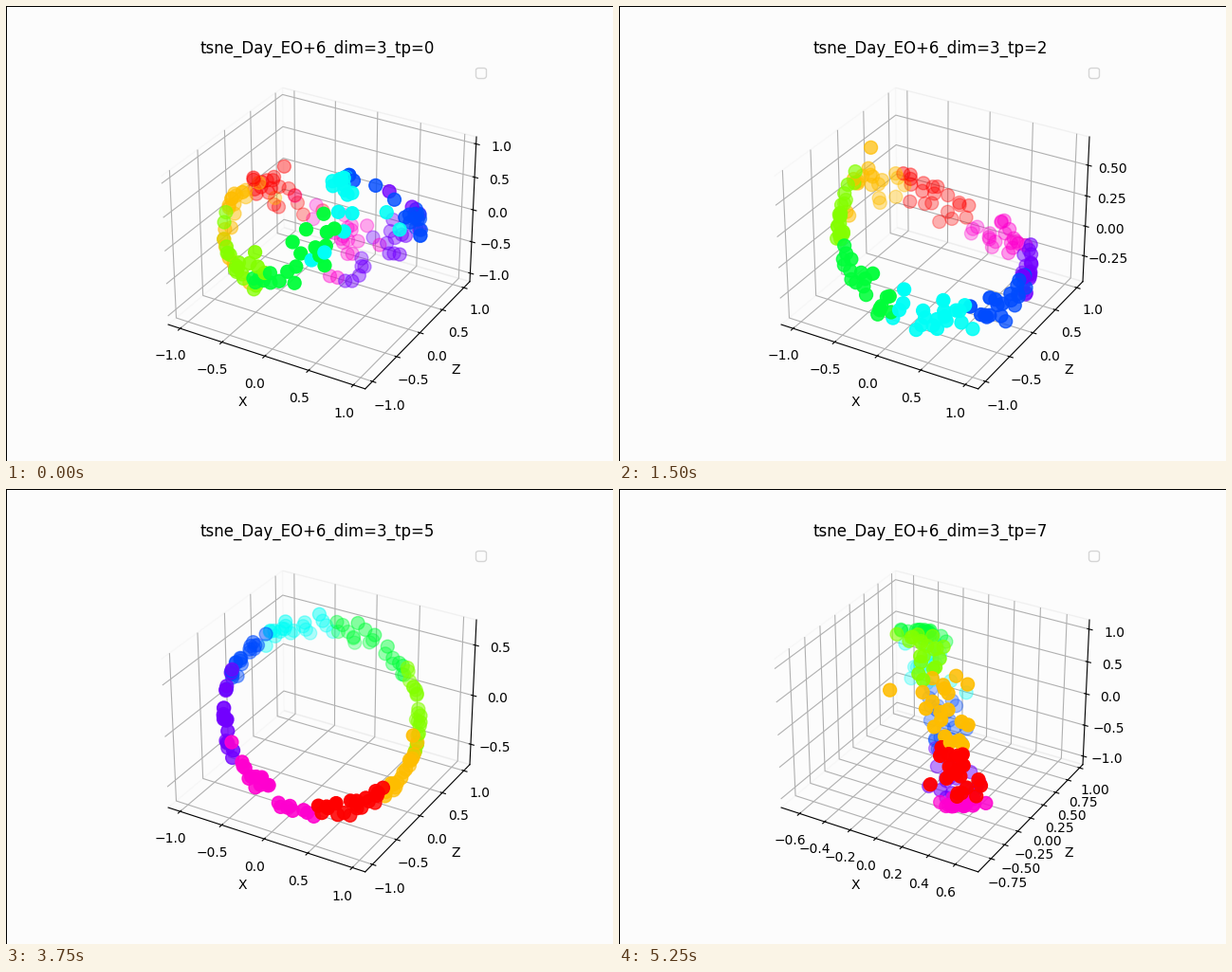
Write a matplotlib script that moves like this. It is 640 px wide and 480 px high and loops after 6 s.

```python
import numpy as np
import matplotlib.pyplot as plt
from matplotlib.animation import FuncAnimation
from matplotlib.ticker import FixedLocator

PAPER = "#fcfcfc"
plt.rcParams.update({"axes.facecolor": PAPER, "figure.facecolor": PAPER})

HUES, PER_HUE = 8, 20
N = HUES * PER_HUE
WIDE = (-1.145, 1.143)
FLAT = ((1, 0, 0), (0, 1, 0))


def unit(v):
    return v / np.linalg.norm(v, axis=-1, keepdims=True)


def ring(start, waves, strand=0, fuzz=0.1, sway=4, plane=FLAT, seed=1):
    """Dots along a wavy ring on the unit sphere.

    start is the angle of the first hue, in degrees. Each wave
    (order, size, peak) lifts the ring out of its plane; strand splits it
    into two parallel rows, fuzz and sway scatter the dots.
    """
    rng = np.random.default_rng(seed)
    turn = start - 180 / HUES + 360 * (np.arange(N) + 0.5) / N
    turn = np.radians(turn + rng.normal(0, sway, N))
    lift = sum(size * np.cos(order * (turn - np.radians(peak)))
               for order, size, peak in waves)
    lift = lift + strand * rng.choice([-1, 1], N) + rng.normal(0, fuzz, N)
    lift = np.clip(lift, -0.95, 0.95)
    flat = np.sqrt(1 - lift**2)
    a, b = unit(np.array(plane, float))
    parts = (flat * np.cos(turn), a), (flat * np.sin(turn), b), (lift, np.cross(a, b))
    return unit(sum(np.outer(amount, axis) for amount, axis in parts))


def midway(one, two):
    return unit(one + two)


def height_range(dots):
    lo, hi = dots[:, 2].min(), dots[:, 2].max()
    pad = 0.073 * (hi - lo)
    return lo - pad, hi + pad


mixed = ring(150, [(0, 0.06, 0), (1, 0.48, 306), (2, 0.52, -15)], fuzz=0.2, sway=12)
band = ring(120, [(0, -0.04, 0), (1, 0.11, 310)], strand=0.12, fuzz=0.05, sway=6)
tilted = ring(120, [(1, 0.55, 180), (2, 0.18, 182)])
upright = ring(-90, [], plane=((1, 0, 0.05), (-0.2, 0.67, 0.71)))
drum = ring(345, [(0, 0.03, 0), (1, 0.16, 200)], strand=0.09, fuzz=0.05)
narrow = ring(-22.5, [(0, -0.07, 0), (1, 0.1, 0)],
              plane=((0.5, -0.8, 0.45), (-0.28, 0.3, 0.9)))
rising = midway(band, tilted)
settling = midway(upright, drum)

# Dots, axis limits and tick steps of each stage
stages = [
    (mixed, ((-1.145, 1.13), WIDE, (-1.135, 1.105)), (0.5, 0.5, 0.5)),
    (band, (WIDE, WIDE, (-0.3695, 0.3265)), (0.5, 0.5, 0.1)),
    (rising, (WIDE, WIDE, height_range(rising)), (0.5, 0.5, 0.25)),
    (tilted, ((-1.12, 1.145), WIDE, (-1.04, 1.108)), (0.5, 0.5, 0.5)),
    (upright, ((-1.155, 1.145), (-0.96, 1.0), (-1.105, 1.135)), (0.5, 0.25, 0.5)),
    (settling, (WIDE, WIDE, height_range(settling)), (0.5, 0.5, 0.5)),
    (drum, (WIDE, WIDE, (-0.239, 0.514)), (0.5, 0.5, 0.1)),
    (narrow, ((-0.748, 0.768), (-0.983, 1.069), (-1.138, 1.14)), (0.2, 0.25, 0.5)),
]
colors = np.repeat(plt.get_cmap("hsv")(np.arange(HUES) / HUES), PER_HUE, axis=0)

fig = plt.figure(figsize=(6.4, 4.8), dpi=100)
ax = fig.add_subplot(projection="3d")
for corner, w, h in [((0, 0), 1 / 640, 1), ((0, 479 / 480), 1, 1 / 480)]:
    fig.add_artist(plt.Rectangle(corner, w, h, color="black", lw=0))


def ticks(lim, step):
    """Multiples of step, leaving a small margin at both ends."""
    margin = (lim[1] - lim[0]) / 50
    first = np.ceil((lim[0] + margin) / step)
    last = np.floor((lim[1] - margin) / step)
    return np.arange(first, last + 1) * step


def draw(k):
    dots, lims, steps = stages[k]
    ax.cla()
    ax.scatter(*dots.T, c=colors, s=100)
    ax.set(xlim=lims[0], ylim=lims[1], zlim=lims[2], xlabel="X", ylabel="Z",
           title=f"tsne_Day_EO+6_dim=3_tp={k}")
    for axis, lim, step in zip((ax.xaxis, ax.yaxis, ax.zaxis), lims, steps):
        axis.set_major_locator(FixedLocator(ticks(lim, step)))
        axis.pane.set_fill(False)
    ax.legend(handles=[], loc="upper right")


anim = FuncAnimation(fig, draw, frames=len(stages), interval=750, repeat=True)
plt.show()
```
